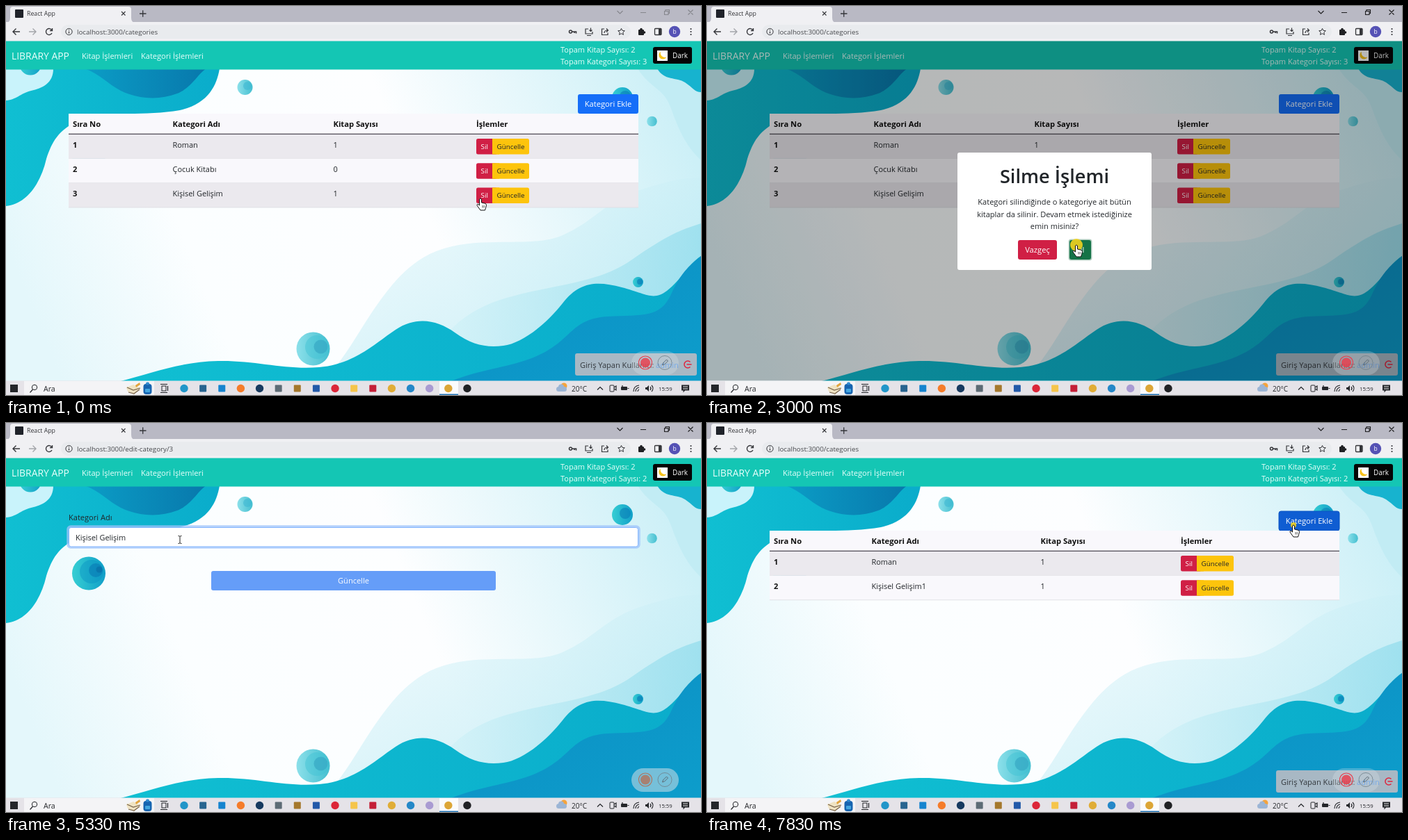
Recreate the animation shown at these times as an HTML page. Size 999x560 px, loop 8 s.

```html
<!DOCTYPE html>
<html lang="tr">
<head>
<meta charset="utf-8">
<title>Library App</title>
<style>
html, body { margin: 0; width: 100%; height: 100%; overflow: hidden; background: #fff; }
svg { display: block; width: 999px; height: 560px; font-family: "Open Sans", "Noto Sans", sans-serif; }
text { white-space: pre; }
</style>
</head>
<body>
<svg viewBox="0 0 999 560" xmlns="http://www.w3.org/2000/svg">
  <defs>
    <linearGradient id="sky" x1="0" y1=".6" x2="1" y2=".4">
      <stop offset="0" stop-color="#e4f7fb"/><stop offset=".25" stop-color="#fbfeff"/>
      <stop offset=".6" stop-color="#fdfeff"/><stop offset="1" stop-color="#cdf0f7"/>
    </linearGradient>
    <linearGradient id="teal"><stop offset="0" stop-color="#10bfd2"/><stop offset="1" stop-color="#0aaccb"/></linearGradient>
    <linearGradient id="deep" x2="1" y2="1"><stop offset="0" stop-color="#0c8ec4"/><stop offset="1" stop-color="#0d9dcb"/></linearGradient>
    <linearGradient id="navy"><stop offset="0" stop-color="#0b9dc6"/><stop offset="1" stop-color="#0878ac"/></linearGradient>
    <linearGradient id="mist" x2="1" y2="1"><stop offset="0" stop-color="#edfafd"/><stop offset="1" stop-color="#a9e4f0"/></linearGradient>
    <linearGradient id="haze" x2="1"><stop offset="0" stop-color="#d8f4f9"/><stop offset="1" stop-color="#8adaeb"/></linearGradient>
    <linearGradient id="ball"><stop offset="0" stop-color="#36ced3"/><stop offset="1" stop-color="#119fc8"/></linearGradient>
    <linearGradient id="pale"><stop offset="0" stop-color="#8ce0ea"/><stop offset="1" stop-color="#45bfd0"/></linearGradient>
  </defs>
  <g id="backdrop"></g>
  <g id="page"></g>
  <g id="chrome"></g>
  <g id="top"></g>
</svg>
<script>
const FRAMES = 48, LOOP = 8000;
const byId = id => document.getElementById(id);

const rect = (x, y, w, h, fill, r = 0, more = '') =>
  `<rect x="${x}" y="${y}" width="${w}" height="${h}" rx="${r}" fill="${fill}" ${more}/>`;
const disc = (x, y, r, fill, more = '') => `<circle cx="${x}" cy="${y}" r="${r}" fill="${fill}" ${more}/>`;
const shape = (d, fill, more = '') => `<path d="${d}" fill="${fill}" ${more}/>`;
const line = (d, color, w = 1.2, more = '') =>
  `<path d="${d}" fill="none" stroke="${color}" stroke-width="${w}" ${more}/>`;
const text = (x, y, s, size = 11.05, fill = '#212529', more = '') =>
  `<text x="${x}" y="${y}" font-size="${size}" fill="${fill}" ${more}>${s}</text>`;
const centred = 'text-anchor="middle"', bold = 'font-weight="700"';
const button = (x, y, w, h, fill, label, size = 11.2, color = '#fff') =>
  rect(x, y, w, h, fill, 3) + text(x + w / 2, y + h / 2 + size * .37, label, size, color, centred);

function backdrop() {
  return rect(0, 50, 999, 490, 'url(#sky)')
    + shape('M455 540C500 500 535 400 600 362S750 352 800 330S860 280 920 262S975 250 999 246V540Z', 'url(#mist)', 'opacity=".65"')
    + shape('M590 540C620 480 650 440 720 420S850 400 900 365S970 322 999 313V540Z', 'url(#haze)', 'opacity=".65"')
    + shape('M908 90C925 118 945 118 955 145S975 200 999 222V90Z', '#c0ebf4', 'opacity=".8"')
    + shape('M936 90C946 108 964 102 976 110S990 124 999 124V90Z', '#17b3cf')
    + shape('M0 90H307C303 115 290 141 250 150C200 159 150 150 105 165C75 178 66 196 58 220C50 255 30 285 0 288Z', 'url(#teal)')
    + shape('M113 90C135 98 146 112 165 122C190 134 220 136 246 126C268 117 275 98 288 90Z', 'url(#navy)')
    + shape('M0 90H68C68 112 52 118 36 122S15 135 0 136Z', '#c9f3fb')
    + disc(35, 84, 15.5, 'url(#ball)')
    + shape('M165 540C205 530 250 512 305 511S400 524 450 520S530 486 560 466S620 452 645 470S690 492 715 489S775 460 800 428S850 396 885 405S930 425 950 410S980 372 999 360V540Z', 'url(#teal)')
    + shape('M640 540C690 520 735 520 775 498S815 450 865 447S940 450 956 415S985 372 999 360V540Z', 'url(#deep)')
    + disc(343.5, 117, 11, 'url(#pale)') + disc(347, 115, 6, '#3db8d2', 'opacity=".6"')
    + disc(886, 132, 15, 'url(#ball)') + disc(890, 130, 8, '#0879b5', 'opacity=".55"')
    + disc(928.5, 166, 7.3, 'url(#pale)')
    + disc(119, 216.5, 24, 'url(#ball)') + disc(123, 214, 17, '#0b93c2', 'opacity=".45"')
    + disc(129, 212, 10, '#0877b2', 'opacity=".55"') + disc(134, 211, 4.5, '#086aa4', 'opacity=".6"')
    + disc(908.5, 397.5, 7.5, 'url(#ball)') + disc(911, 397, 4, '#0879b5', 'opacity=".6"')
    + disc(441.5, 493.5, 24, 'url(#pale)') + disc(447, 491, 17, '#3fc0d2', 'opacity=".45"')
    + disc(452.5, 490.5, 10, '#35a6c3', 'opacity=".65"');
}

function browserBar() {
  const ink = '#35363a';
  return rect(0, 0, 999, 24, '#b9b9c4')
    + shape('M1 24Q6 23 6 17V5Q6 1 10 1H176Q180 1 180 5V17Q180 23 185 24Z', '#f0f0f3')
    + rect(0, 23, 999, 27.5, '#f0f0f3')
    + rect(13, 5, 12, 12, '#20232a', 1) + text(30, 14, 'React App', 8.75, ink)
    + line('M166 8l5.5 5.5m0-5.5l-5.5 5.5', ink, 1.1) + line('M192 11h9.5M196.7 6.3v9.5', ink, 1.3)
    + line('M20 37H10M14.5 32.5L10 37l4.5 4.5', ink, 1.4)
    + line('M33 37h10M38.5 32.5L43 37l-4.5 4.5', '#a3a5aa', 1.4)
    + line('M66 35A4.5 4.5 0 1 0 66 39M66.5 32v3.5h-3.5', ink, 1.4)
    + rect(79, 27, 819, 20, '#e9ebee', 10)
    + disc(90.5, 37, 4.6, 'none', `stroke="${ink}"`) + line('M90.5 36.5v3M90.5 34v1', ink)
    + disc(811.5, 37, 2, 'none', `stroke="${ink}" stroke-width="1.5"`) + line('M813.5 37h6v2.5M817 37v2', ink, 1.6)
    + line('M837 33h-4v7h10v-3M835 42.5h6M840.5 31.5v5m-2-2l2 2 2-2', ink)
    + line('M860 33h-3.5v8.5h8.5v-3M860 39q0-4 5-4m-2-2.5l2.5 2.5-2.5 2.5', ink)
    + line('M884.5 32.3l1.4 3 3.4.4-2.5 2.3.7 3.3-3-1.6-3 1.6.7-3.3-2.5-2.3 3.4-.4Z', ink, 1)
    + rect(909, 34, 8, 8, '#202124', 1) + disc(913, 33.5, 1.8, '#202124') + disc(917.5, 38, 1.8, '#202124')
    + rect(932.5, 32.5, 9.5, 9, 'none', 1, `stroke="${ink}" stroke-width="1.3"`) + rect(938, 33, 4, 8, ink)
    + disc(961, 37, 8.2, '#5552b5') + text(961, 40, 'b', 8.5, '#fff', centred)
    + [33, 37, 41].map(y => disc(984.5, y, 1.1, ink)).join('');
}

function taskbar() {
  const ink = '#24262a';
  const apps = ['#2196c9', '#28648f', '#1684cf', '#f57c2a', '#173a60', '#5d6b75', '#a5782c', '#2259a8',
    '#dc2638', '#f5c54b', '#c41f37', '#e0ad37', '#2588c8', '#a99bd2', '#dca637', '#202124'];
  const square = new Set([1, 2, 5, 6, 7, 9, 10]);
  return rect(0, 539.5, 999, 21, '#e5e3e8') + rect(26, 540, 187, 20, '#f4f4f6')
    + rect(6, 545, 11, 11, ink)
    + disc(41, 549, 3.7, 'none', `stroke="${ink}"`) + line('M38.5 552l-4 4.5', ink)
    + text(54, 555, 'Ara', 10.6, ink)
    + shape('M173 549l10-4 10 5-9 9-9-4Z', '#efe3c3') + line('M174 549l9 4 10-3M176 556l8 2 8-6', '#78634a')
    + shape('M186 546l6-4 1 3-6 4Z', '#e2a43c')
    + rect(197.5, 544, 12, 15, '#1764b0', 4) + rect(201, 541.5, 5, 4, '#338bd0', 2) + rect(200, 551, 7, 5, '#43a6df', 1)
    + rect(224, 547, 6, 7, 'none', 0, `stroke="${ink}"`) + line('M222 544.5h10M222 556.5h10M232.5 547v7', ink)
    + rect(623, 540, 27, 20, '#fafbfd') + rect(623, 558.5, 27, 1.5, '#2677b8')
    + apps.map((c, i) => {
      const x = 256 + i * 27.13;
      return square.has(i) ? rect(x - 5, 545.5, 10, 10, c, 1) : disc(x, 550.5, 5.7, c);
    }).join('')
    + disc(802, 547, 4.5, '#f5a33b') + rect(791, 548, 15, 7, '#9cb5d5', 3.5) + disc(798, 548.5, 4, '#9cb5d5')
    + text(813, 554.5, '20°C', 10, ink)
    + line('M850 552.5l4-4 4 4', ink) + rect(868, 546, 6, 9, 'none', 1, `stroke="${ink}"`) + line('M874 549l3-2v6l-3-2', ink)
    + rect(884, 548, 9, 5, ink, 1) + line('M893.5 550.5h2M886 546v2', ink)
    + line('M902 555q0-8 8-9M905 555q0-5 5-6M908 555q0-2 2-3', ink)
    + shape('M919 549h2l3-3v9l-3-3h-2Z', ink) + line('M926 548q2 2.5 0 5M928 546q4 4.5 0 9', ink)
    + text(938, 553.5, '15:59', 7.7, ink)
    + shape('M971 545.5h11v8h-6l-2.5 3v-3H971Z', ink) + line('M973 548h7M973 551h7', '#fff', .9);
}

function navbar(categories) {
  const ink = '#e9fffb';
  return rect(0, 50, 999, 41.5, '#14c6b4')
    + text(8, 76.5, 'LIBRARY APP', 13.9, ink)
    + text(109, 75.5, 'Kitap İşlemleri', 11.05, ink) + text(194, 75.5, 'Kategori İşlemleri', 11.05, ink)
    + text(797, 66.5, 'Topam Kitap Sayısı: 2', 11, ink)
    + text(797, 84, `Topam Kategori Sayısı: ${categories}`, 11, ink)
    + rect(930, 59, 56, 24, '#050505', 3) + rect(936, 64, 15, 15, '#fff')
    + shape('M941 65.5A6 6 0 1 0 949.5 73.5A6.5 6.5 0 0 1 941 65.5Z', '#f7c21b')
    + text(958, 75, 'Dark', 9.9, '#fff');
}

function badge() {
  return rect(818, 500, 175, 32, '#c3bec4', 3, 'opacity=".85"')
    + text(825, 520.5, 'Giriş Yapan Kullanıcı:', 11.05, '#33383d')
    + text(934, 520.5, 'admin', 11.05, '#4d91e8')
    + line('M983.5 512.5A5 5 0 1 0 983.5 519.5M978.5 516h7', '#e0243c', 1.5);
}

function table(names, cols, hover) {
  const [c0, c1, c2, c3] = cols;
  const head = ['Sıra No', 'Kategori Adı', 'Kitap Sayısı', 'İşlemler'];
  const rows = names.map((name, i) => {
    const y = 184.5 + i * 35.2;
    return rect(90, y, 819, 35.2, i % 2 ? '#f9f8fc' : '#ebe9ee') + rect(90, y + 34.7, 819, .8, '#dcdce2')
      + text(c0, y + 19.5, i + 1, 11.05, '#111', bold) + text(c1, y + 19.5, name, 10.95)
      + text(c2, y + 19.5, name === 'Çocuk Kitabı' ? 0 : 1, 10.95)
      + rect(c3, y + 6.5, 30, 22.5, '#d01f45', 2.5) + rect(c3 + 26, y + 6.5, 50, 22.5, '#fdc40c', 2.5)
      + rect(c3 + 23, y + 6.5, 10, 22.5, '#fdc40c')
      + text(c3 + 6.5, y + 21.5, 'Sil', 9.85, '#fff') + text(c3 + 29.5, y + 21.5, 'Güncelle', 9.85);
  }).join('');
  return button(822, 127, 87, 28, hover ? '#0f5dd2' : '#156ef8', 'Kategori Ekle')
    + (hover ? rect(822, 127, 87, 28, 'none', 3, 'stroke="#0a55c4"') : '')
    + rect(90, 155, 819, 30, '#f9f8fc') + head.map((s, i) => text(cols[i], 174, s, 11.2, '#111', bold)).join('')
    + rows + rect(90, 183.7, 819, 1.2, '#45434c');
}

function editForm(focused, value, enabled) {
  return text(90, 140, 'Kategori Adı', 11.05)
    + (focused ? rect(89, 149, 821, 30, 'none', 4, 'stroke="#9fc3fb" stroke-width="3.5" opacity=".75"') : '')
    + rect(90.5, 150.5, 818, 27.5, '#fff', 3, `stroke="${focused ? '#86b7fe' : '#cbd3da'}"`)
    + text(100, 168.5, value, 10.95)
    + button(295, 213, 409, 28, enabled ? '#156ef8' : '#659df8', 'Güncelle', 11.05);
}

function modal(pressed) {
  const lines = ['Kategori silindiğinde o kategoriye ait bütün', 'kitaplar da silinir. Devam etmek istediğinize', 'emin misiniz?'];
  return rect(0, 50, 999, 489.5, '#000', 0, 'opacity=".28"')
    + rect(360, 211, 279, 169, '#fff', 3)
    + text(499.5, 255, 'Silme İşlemi', 27.2, '#212529', centred + ' font-weight="600"')
    + lines.map((s, i) => text(499.5, 286 + i * 17.5, s, 11.05, '#212529', centred)).join('')
    + button(447, 337, 56, 28, '#d01f45', 'Vazgeç')
    + (pressed ? rect(519.5, 335.5, 34, 31, '#b3cfc2', 4) : '')
    + button(521, 337, 31, 28, pressed ? '#157347' : '#198f5f', 'Sil');
}

function recorder(overBadge) {
  const red = overBadge ? '#e8404f' : '#b0755f';
  return rect(899, 497, 68, 34, '#dfe6ea', 17, `opacity="${overBadge ? .28 : .5}"`)
    + disc(919, 513.5, 9.5, 'none', `stroke="${red}" stroke-width="1.2"`)
    + disc(919, 513.5, 7, red, 'opacity=".85"')
    + disc(947, 513.5, 10, 'none', 'stroke="#70808a" opacity=".8"')
    + line('M943.5 517l1-3 5-5 2 2-5 5Z', '#5c6b75', 1);
}

function windowButtons(active) {
  const ink = active ? '#1c1c1e' : '#85868c';
  return line('M878.5 7l4 4 4-4M912 9.5h8M980.5 5.5l7 7m0-7l-7 7M946.5 7.5h5.5v5h-5.5ZM948 7v-1.5h5.5v5h-1.5', ink, 1.1);
}

const CURSORS = {
  arrow: shape('M0 0V12.5l2.9-2.7 2 4.4 2-.9-2-4.3h4Z', '#fff', 'stroke="#111" stroke-width=".9"'),
  hand: shape('M-1.5 1q1.5-2 3 0v5l5 1.2q2 .5 2 2.5l-1 4-1 3.3h-6.5l-4-5.5q-2-2.5-.5-3t3 1.5Z', '#fff', 'stroke="#111"')
    + line('M3 10v3.5M5.2 10v3.5', '#111', .7),
  beam: line('M-2.5-5.5q2 0 2.5 1q.5-1 2.5-1M0-4.5v9M-2.5 5.5q2 0 2.5-1q.5 1 2.5 1', '#222', 1),
};
// Cursor tip: step, x, y
const PATH = [[0, 682, 277], [1, 682, 277], [5, 686, 237], [10, 686, 237], [15, 531, 344], [18, 531, 344], [19, 538, 338],
  [22, 712, 238], [24, 712, 238], [26, 340, 178], [28, 250, 168], [34, 250, 168], [37, 321, 222], [41, 321, 222],
  [47, 843, 147]];
const KINDS = [[0, 'hand'], [7, 'arrow'], [15, 'hand'], [19, 'arrow'], [22, 'hand'], [25, 'arrow'], [26, 'beam'],
  [36, 'hand'], [41, 'arrow'], [47, 'hand']];
// Click highlight: step, radius, opacity
const CLICKS = [[6, 9, .9], [7, 18, .3], [18, 9, .9], [23, 9, .9], [28, 9, .9], [39, 9, .9], [47, 4, .9]];

function tipAt(n) {
  const i = Math.max(1, PATH.findIndex(p => p[0] >= n));
  const [n0, x0, y0] = PATH[i - 1], [n1, x1, y1] = PATH[i];
  const k = (n - n0) / (n1 - n0), eased = k * k * (3 - 2 * k);
  return [x0 + (x1 - x0) * eased, y0 + (y1 - y0) * eased];
}

function cursor(n) {
  const [x, y] = tipAt(n);
  const kind = KINDS.filter(k => k[0] <= n).pop()[1];
  const click = CLICKS.find(c => c[0] === n);
  return (click ? disc(x, y, click[1], '#efd21f', `opacity="${click[2]}"`) : '')
    + `<g transform="translate(${x} ${y})">${CURSORS[kind]}</g>`;
}

function draw(n) {
  const editing = n >= 24 && n < 41, asking = n >= 7 && n < 19;
  const value = 'Kişisel Gelişim' + (n >= 33 ? '1' : '');
  const names = n < 19 ? ['Roman', 'Çocuk Kitabı', value] : ['Roman', value];
  const cols = n < 41 ? [96, 239.5, 470.5, 676] : [96, 236.5, 479.5, 681];
  byId('page').innerHTML = navbar(n < 19 ? 3 : 2)
    + (editing ? editForm(n >= 29, value, n >= 33) : table(names, cols, n >= 47) + badge())
    + (asking ? modal(n >= 18) : '');
  const bubble = n >= 22 && n <= 26
    ? `<g opacity="${n === 26 ? .45 : 1}">` + rect(0, 525, 127, 15, '#dfe3e8', 2)
      + text(2, 535.5, 'localhost:3000/edit-category/3', 8.7, '#55595e') + '</g>' : '';
  byId('top').innerHTML = windowButtons(n >= 6)
    + text(102, 40.5, 'localhost:3000/' + (editing ? 'edit-category/3' : 'categories'), 9.75, '#45474b')
    + recorder(!editing) + bubble + cursor(n);
}

byId('backdrop').innerHTML = backdrop();
byId('chrome').innerHTML = browserBar() + taskbar();

let shown = -1;
function tick() {
  // Six steps a second; the small offset absorbs rounded step times.
  const n = Math.floor((performance.now() % LOOP + 5) * FRAMES / LOOP) % FRAMES;
  if (n !== shown) draw(shown = n);
  requestAnimationFrame(tick);
}
tick();
</script>
</body>
</html>
```
